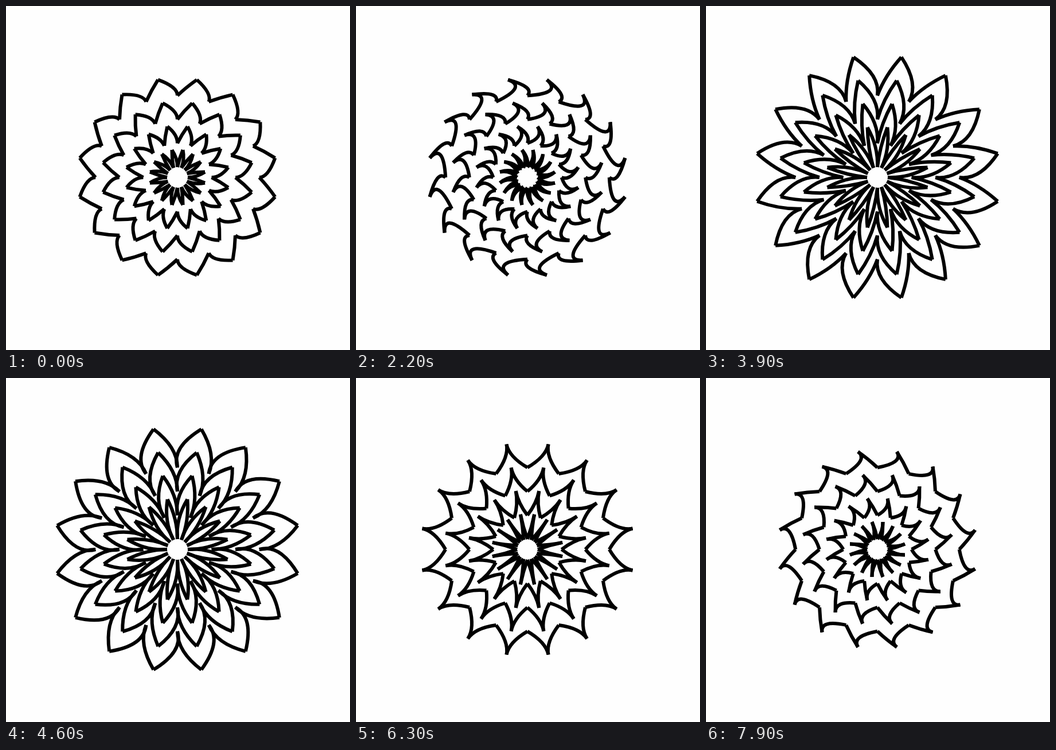
An HTML page with a canvas that plays this animation: 600x600 px, repeating every 8 s.

```html
<!DOCTYPE html>
<html lang="en">
<head>
<meta charset="utf-8">
<title>Petal rings</title>
<style>
  html, body { margin: 0; width: 100%; height: 100%; overflow: hidden; background: #fefefe; }
  canvas { display: block; width: 600px; height: 600px; }
</style>
</head>
<body>
<canvas id="stage" width="600" height="600"></canvas>
<script>
const ctx = document.getElementById('stage').getContext('2d');
const LOOP = 8000, STEP = 100;
const CENTER = 299, PETALS = 16, RINGS = 4;
const INNER = 18, GAP = 41.6;
const LOW = 17.5, RISE = 13.4;
const HALF = Math.PI / PETALS;

// Goes from 0 to 1 between two times.
function ramp(t, from, to) {
  return Math.min(1, Math.max(0, (t - from) / (to - from)));
}

// Soft rise to 1 and back around a time.
function bump(t, mid, reach) {
  const x = Math.min(1, Math.abs(t - mid) / reach);
  return Math.cos(x * Math.PI / 2) ** 2;
}

// Petals grow in whole levels.
function petalHeight(t) {
  const level = 1 - bump(t, 3200, 500) + bump(t, 7750, 120)
    + 3 * ramp(t, 3400, 4000) - 3 * ramp(t, 4900, 6700);
  return LOW + RISE * Math.round(level);
}

// Bends are angles from the petal tip, in half petals.
function clockwiseBend(t) {
  return 1 + 0.5 * bump(t, 2700, 1900)
    - ramp(t, 5500, 6300) + 0.5 * ramp(t, 6300, 7900);
}

function counterBend(t) {
  return -0.5 + 1.5 * ramp(t, 400, 2200) - 2.3 * ramp(t, 2200, 4600)
    + 1.6 * ramp(t, 4600, 5500) - 0.3 * ramp(t, 5500, 6300)
    + 0.5 * ramp(t, 6300, 7900);
}

function polar(r, angle) {
  return [CENTER + r * Math.sin(angle), CENTER - r * Math.cos(angle)];
}

function edge(base, height, tip, side, bend) {
  ctx.beginPath();
  ctx.moveTo(...polar(base, tip + side * HALF));
  ctx.quadraticCurveTo(
    ...polar(base + height / 2, tip + bend * HALF),
    ...polar(base + height, tip)
  );
  ctx.stroke();
}

function draw(t) {
  const height = petalHeight(t);
  const ahead = clockwiseBend(t), behind = counterBend(t);
  ctx.fillStyle = '#fefefe';
  ctx.fillRect(0, 0, 600, 600);
  ctx.strokeStyle = '#000';
  ctx.lineWidth = 6;
  for (let ring = 0; ring < RINGS; ring++) {
    const base = INNER + GAP * ring;
    for (let k = 0; k < PETALS; k++) {
      const tip = (2 * k + 1) * HALF;
      edge(base, height, tip, 1, ahead);
      edge(base, height, tip, -1, behind);
    }
  }
}

const start = performance.now();
function tick() {
  const t = (performance.now() - start) % LOOP;
  draw(Math.floor(t / STEP) * STEP);
  requestAnimationFrame(tick);
}
tick();
</script>
</body>
</html>
```
